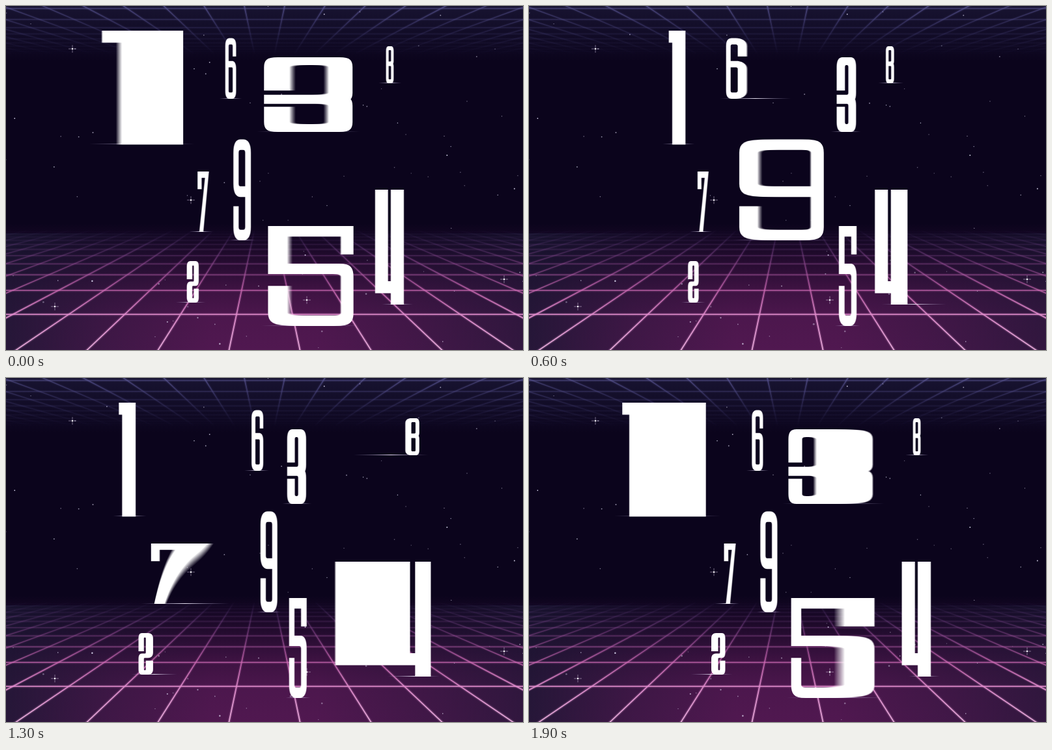
Write an HTML page with a canvas that moves like this. It is 794 px wide and 530 px high and loops after 2 s.

```html
<!DOCTYPE html>
<html lang="en">
<head>
<meta charset="utf-8">
<title>Stretching numbers</title>
<style>
html, body { margin: 0; width: 100%; height: 100%; overflow: hidden; background: #0b041c; }
canvas { display: block; }
</style>
</head>
<body>
<canvas id="stage" width="794" height="530"></canvas>
<script>
const W = 794, H = 530, CX = 397;
const LOOP = 2000, STEP = 100;
const WAVE = 265, JUMP = 124, START = 1500;
const SHUTTER = 22, SAMPLES = 16;
const BAR = 0.105, ROUND = 0.13;

// Each digit is one or two strokes through points of the unit box; a third value keeps a corner square.
// pen: stem width as a part of the digit's width
const digits = [
  { x: 185, w: 46, top: 38, bottom: 213.5, pen: 0.8, square: true,
    strokes: [[[0, 0], [1, 0], [1, 1]]] },
  { x: 264.5, w: 31, top: 255, bottom: 348, pen: 0.35, square: true,
    strokes: [[[0, 0.21], [0, 0], [1, 0], [0.23, 1]]] },
  { x: 573.5, w: 21.5, top: 62, bottom: 119, pen: 0.34,
    strokes: [[[0, 0.46], [0, 0], [1, 0], [1, 0.46], [0, 0.46]],
              [[0, 0.48], [1, 0.48], [1, 1], [0, 1], [0, 0.48]]] },
  { x: 341, w: 30.5, top: 49.5, bottom: 143, pen: 0.31,
    strokes: [[[1, 0.22], [1, 0], [0, 0], [0, 1], [1, 1], [1, 0.42], [0, 0.42]]] },
  { x: 364, w: 47, top: 205.5, bottom: 361, pen: 0.31,
    strokes: [[[1, 0.52], [0, 0.52], [0, 0], [1, 0], [1, 1], [0, 1], [0, 0.74]]] },
  { x: 238.3, w: 29.2, top: 393, bottom: 457, pen: 0.43,
    strokes: [[[0, 0.37], [0, 0], [1, 0], [1, 0.55], [0, 0.55], [0, 1], [1, 1], [1, 0.74]]] },
  { x: 438, w: 52.5, top: 79, bottom: 194, pen: 0.41,
    strokes: [[[0, 0.38], [0, 0], [1, 0], [1, 0.56], [0, 0.56]],
              [[0, 0.58], [1, 0.58], [1, 1], [0, 1], [0, 0.74]]] },
  { x: 443.5, w: 48.5, top: 339, bottom: 493, pen: 0.31,
    strokes: [[[1, 0.2], [1, 0, 1], [0, 0, 1], [0, 0.42, 1], [1, 0.42], [1, 1], [0, 1], [0, 0.67]]] },
  { x: 543, w: 80, top: 283, bottom: 460, pen: 0.45, square: true,
    strokes: [[[0, 0], [0, 0.89], [1, 0.89]], [[1, 0], [1, 1]]] }
];

const sparkles = [[102, 66], [75, 463], [462, 453], [765, 421], [284, 299]];

const lerp = (a, b, k) => a + (b - a) * k;
const layer = () => Object.assign(document.createElement("canvas"), { width: W, height: H });

function seeded(seed) {
  return () => (seed = seed * 16807 % 2147483647) / 2147483647;
}

function fade(g, x0, y0, x1, y1, ...colors) {
  const grad = g.createLinearGradient(x0, y0, x1, y1);
  colors.forEach((color, i) => grad.addColorStop(i / (colors.length - 1), color));
  return grad;
}

function paintGrid(g, mirror, stroke) {
  const line = (x0, y0, x1, y1, width) => {
    for (const [w, alpha] of [[width + 3, 0.18], [width, 0.9]]) {
      g.globalAlpha = alpha;
      g.lineWidth = w;
      g.beginPath();
      g.moveTo(x0, mirror(y0));
      g.lineTo(x1, mirror(y1));
      g.stroke();
    }
  };
  g.strokeStyle = stroke;
  for (let n = 0; n < 12; n++) {
    const y = 300 + 1 / (0.00571 + n * 0.001525);
    line(0, y, W, y, Math.max(0.8, (y - 300) / 95));
  }
  for (let n = -19.5; n < 20; n++) {
    const x = y => CX + n * 109 * (y - 271) / 259;
    line(x(345), 345, x(540), 540, Math.abs(n) < 5 ? 1.8 : 1.2);
  }
  g.globalAlpha = 1;
}

function paintSky(g) {
  const random = seeded(11);
  for (let i = 0; i < 85; i++) {
    const x = random() * W, y = random() * H;
    g.fillStyle = `rgba(225,222,245,${lerp(0.35, 0.9, random())})`;
    g.beginPath();
    g.arc(x, y, lerp(0.5, y > 380 ? 1.5 : 1, random()), 0, 7);
    g.fill();
  }
  for (const [x, y] of sparkles) {
    g.fillStyle = "rgba(235,225,250,.45)";
    g.fillRect(x - 6, y - 0.5, 12, 1);
    g.fillRect(x - 0.5, y - 6, 1, 12);
    g.fillStyle = "#fff";
    g.fillRect(x - 1, y - 1, 2, 2);
  }
}

function paintBackground() {
  const c = layer(), g = c.getContext("2d");
  g.fillStyle = "#0b041c";
  g.fillRect(0, 0, W, H);
  g.fillStyle = fade(g, 0, 0, 0, 85, "rgba(50,52,92,.32)", "rgba(50,52,92,0)");
  g.fillRect(0, 0, W, 85);
  g.fillStyle = fade(g, 0, 335, 0, H, "rgba(80,24,80,0)", "rgba(80,24,80,.3)",
    "rgba(80,24,80,.7)", "rgba(80,24,80,.95)", "rgb(80,24,80)");
  g.fillRect(0, 335, W, H);
  g.fillStyle = fade(g, 0, 0, W, 0, "rgba(24,22,48,.75)", "rgba(24,22,48,.3)", "rgba(24,22,48,0)",
    "rgba(24,22,48,0)", "rgba(24,22,48,.25)", "rgba(24,22,48,.55)");
  g.fillRect(0, 350, W, H);

  paintGrid(g, y => y, fade(g, 0, 345, 0, H, "rgba(95,70,140,0)", "rgba(135,70,140,.6)",
    "rgba(205,105,180,.85)", "rgb(232,150,212)", "rgb(242,180,228)"));
  paintGrid(g, y => 418 - y, fade(g, 0, 0, 0, 75, "rgba(92,88,150,.75)", "rgba(75,70,130,.35)", "rgba(60,55,110,0)"));
  paintSky(g);
  return c;
}

// Rounds the corners of a polygon and cuts its edges into short pieces that can bend.
function soften(pts) {
  const toward = (p, q) => {
    const len = Math.hypot(q.x - p.x, q.y - p.y) || 1;
    const k = Math.min(p.r, len / 2) / len;
    return { x: lerp(p.x, q.x, k), y: lerp(p.y, q.y, k) };
  };
  const n = pts.length;
  return pts.flatMap((p, i) => {
    const next = pts[(i + 1) % n];
    const a = toward(p, pts[(i + n - 1) % n]), b = toward(p, next), end = toward(next, p);
    const out = [];
    for (let k = 0; k < 1; k += 0.125) {
      out.push([lerp(lerp(a.x, p.x, k), lerp(p.x, b.x, k), k), lerp(lerp(a.y, p.y, k), lerp(p.y, b.y, k), k)]);
    }
    for (let k = 0; k < 1; k += 0.0625) out.push([lerp(b.x, end.x, k), lerp(b.y, end.y, k)]);
    return out;
  });
}

// Outline of a stroke drawn with a pen that is wide on stems and thin on bars.
function outline(d, stroke) {
  const h = d.bottom - d.top;
  const px = d.pen * d.w / 2, py = BAR * h / 2;
  const pts = stroke.map(([u, v, sharp]) => ({
    x: d.x + px + u * (d.w - 2 * px), y: d.top + py + v * (h - 2 * py), sharp: sharp || d.square
  }));
  const dirs = pts.slice(1).map((p, i) => {
    const dy = Math.sign(p.y - pts[i].y);
    return { x: dy ? 0 : Math.sign(p.x - pts[i].x), y: dy };
  });
  const ahead = [], back = [];
  pts.forEach((p, i) => {
    const a = dirs[i - 1], b = dirs[i];
    const from = a || { x: -b.y, y: b.x }, to = b || { x: -a.y, y: a.x };
    let nx = (from.y + to.y) * px, ny = -(from.x + to.x) * py;
    let ex = 0, ey = 0;
    if (!a || !b) {
      const dir = a || b, way = a ? 1 : -1;
      nx = dir.y * px;
      ny = -dir.x * py;
      ex = way * dir.x * px;
      ey = way * dir.y * py;
    }
    const turn = a && b ? a.x * b.y - a.y * b.x : 0;
    const radius = side => p.sharp || !turn ? 0 : turn * side > 0 ? ROUND * h : 0.03 * h;
    ahead.push({ x: p.x + ex + nx, y: p.y + ey + ny, r: radius(1) });
    back.unshift({ x: p.x + ex - nx, y: p.y + ey - ny, r: radius(-1) });
  });
  return soften([...ahead, ...back]);
}

for (const d of digits) {
  d.contours = d.strokes.map(s => outline(d, s));
  const feet = d.contours.flat().filter(([, y]) => y > d.bottom - 0.5).map(([x]) => x);
  d.foot = [Math.min(...feet) - 25, Math.max(...feet) + 25];
}

// A wave runs to the left: a steady drift, and a quick jump to the right at its crest.
function place(x, t) {
  let s = t - START + x * LOOP / WAVE;
  s -= LOOP * Math.round(s / LOOP);
  const tail = 0.5 / (1 + 0.00494 * Math.abs(s)) ** 3;
  return x + JUMP * (Math.sign(s) * (0.5 - tail) - s / LOOP);
}

const ctx = document.getElementById("stage").getContext("2d");
const background = paintBackground();
const blur = layer(), bctx = blur.getContext("2d");

function fillDigit(d, t) {
  bctx.beginPath();
  for (const contour of d.contours) {
    contour.forEach(([x, y], i) => bctx[i ? "lineTo" : "moveTo"](place(x, t), y));
    bctx.closePath();
  }
  bctx.fill();
}

function groundLine(d, t) {
  const [x0, x1] = d.foot.map(x => place(x, t));
  ctx.fillStyle = fade(ctx, x0, 0, x1, 0, "rgba(190,180,225,0)", "rgba(215,208,238,.4)",
    "rgba(240,235,250,.95)", "rgba(215,208,238,.4)", "rgba(190,180,225,0)");
  ctx.fillRect(x0, Math.floor(d.bottom - 0.6), x1 - x0, 1);
}

function draw(t) {
  ctx.drawImage(background, 0, 0);
  bctx.clearRect(0, 0, W, H);
  bctx.globalCompositeOperation = "lighter";
  bctx.fillStyle = `rgba(255,255,255,${1 / SAMPLES})`;
  for (const d of digits) {
    groundLine(d, t);
    for (let i = 0; i < SAMPLES; i++) fillDigit(d, t + ((i + 0.5) / SAMPLES - 0.5) * SHUTTER);
  }
  ctx.drawImage(blur, 0, 0);
}

let shown = -1;
function tick() {
  const t = Math.floor(performance.now() % LOOP / STEP) * STEP;
  if (t !== shown) draw(shown = t);
  requestAnimationFrame(tick);
}
tick();
</script>
</body>
</html>
```
